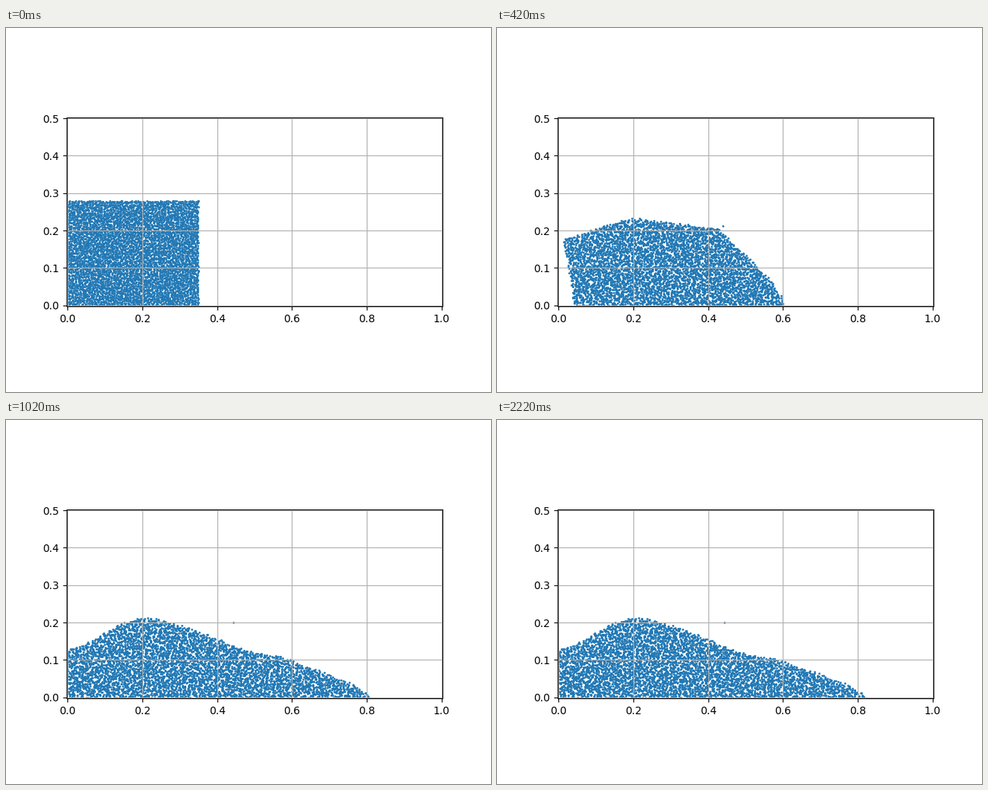
A matplotlib script that plays this animation: 640 by 480 pixels, repeating every 2.28 s.

```python
import math

import numpy as np
import matplotlib.pyplot as plt
from matplotlib.animation import FuncAnimation

COLUMNS, ROWS = 82, 66
FRAMES, INTERVAL = 76, 30
PAD = 0.0025

WIDTH, HEIGHT = 0.35, 0.28      # column at rest
CREST_X = 0.2
SAG_TIME = 0.54                 # the top stops sinking
START, REST = 0.11, 1.2         # the toe stops speeding up, comes to rest
BRAKE = 0.72
TOP_SPEED = BRAKE * (REST - START)
REACH = TOP_SPEED * START / 2 + TOP_SPEED ** 2 / (2 * BRAKE)


def smooth(s):
    s = np.clip(s, 0, 1)
    return s * s * (3 - 2 * s)


def toe_travel(t):
    """Short push from rest, then constant friction."""
    if t < START:
        return TOP_SPEED * t * t / (2 * START)
    return REACH - BRAKE / 2 * (REST - min(t, REST)) ** 2


class Pile:
    """Outline of the collapsing column at time t."""

    def __init__(self, t):
        self.spread = toe_travel(t) / REACH
        sag = min(t / SAG_TIME, 1)
        self.shift = math.sin(math.pi * sag)
        self.toe = WIDTH + toe_travel(t)
        self.left_y = HEIGHT - 0.149 * sag ** 1.6
        self.crest_y = HEIGHT - 0.069 * sag ** 1.3
        self.corner_x = WIDTH + 0.227 * self.spread ** 1.75
        self.corner_y = HEIGHT - 0.175 * self.spread ** 1.4

    def left(self, v):
        return self.shift * (0.06 - 0.043 * v ** 1.5), self.left_y * v

    def right(self, v):
        bulge = 0.17 * math.sqrt(self.spread) * v * (1 - v) ** 2
        return self.toe + (self.corner_x - self.toe) * v + bulge, self.corner_y * v

    def top(self, u):
        x0 = self.left(1)[0]
        x = x0 + (self.corner_x - x0) * u
        rise = smooth((x - x0) / (CREST_X - x0))
        fall = smooth((x - CREST_X) / (self.corner_x - CREST_X))
        y = (self.left_y + (self.crest_y - self.left_y) * rise
             + (self.corner_y - self.crest_y) * fall)
        return x, y

    def floor(self, u):
        x0 = self.left(0)[0]
        return x0 + (self.toe - x0) * u, 0 * u

    def patch(self, u, v):
        """Coons patch spanned by the four sides."""
        sides = zip(self.floor(u), self.top(u), self.left(v), self.right(v),
                    self.floor(0), self.floor(1), self.top(0), self.top(1))
        return [(1 - v) * f + v * t + (1 - u) * l + u * r
                - (1 - v) * ((1 - u) * f0 + u * f1) - v * ((1 - u) * t0 + u * t1)
                for f, t, l, r, f0, f1, t0, t1 in sides]

    def fill(self, a, b, n=151):
        """Map the unit square onto the pile with even density."""
        s = np.linspace(0, 1, n)
        x, y = self.patch(*np.meshgrid(s, s, indexing="ij"))
        xu, xv = np.gradient(x, s, s)
        yu, yv = np.gradient(y, s, s)
        area = np.maximum(xu * yv - yu * xv, 1e-4)
        u = np.interp(a, running_share(area.mean(axis=1)), s)
        shares = [running_share(column) for column in area]
        nearest = np.rint(u * (n - 1)).astype(int)
        v = np.array([np.interp(h, shares[k], s) for h, k in zip(b, nearest)])
        return np.column_stack(self.patch(u, v))


def running_share(weight):
    total = np.append(0, np.cumsum((weight[1:] + weight[:-1]) / 2))
    return total / total[-1]


def stray(t):
    """One grain thrown off the upper corner."""
    return [WIDTH + 0.094 * (1 - math.exp(-t / 0.15)), 0.2 + 0.08 * math.exp(-t / 0.22)]


rng = np.random.default_rng(4)
i, j = np.meshgrid(np.arange(COLUMNS), np.arange(ROWS))
a = (i.ravel() + rng.random(i.size)) / COLUMNS
b = (j.ravel() + rng.random(i.size)) / ROWS
drift = rng.normal(0, 0.0022, (i.size, 2))


def positions(t):
    pile = Pile(min(t, REST))
    grains = pile.fill(a, b) + drift * min(1, 2 * pile.spread)
    return np.vstack([np.maximum(grains, 0), stray(t)])


fig, ax = plt.subplots(figsize=(6.4, 4.8), dpi=100)
ax.set_aspect("equal")
ax.set_xlim(-PAD, 1 + PAD)
ax.set_ylim(-PAD, 0.5 + PAD)
ax.grid(True)
dots = ax.scatter(*positions(0).T, s=1, linewidths=1, color="tab:blue")


def update(frame):
    dots.set_offsets(positions(frame * INTERVAL / 1000))
    return dots,


animation = FuncAnimation(fig, update, frames=FRAMES, interval=INTERVAL, repeat=True, repeat_delay=0)
plt.show()
```
